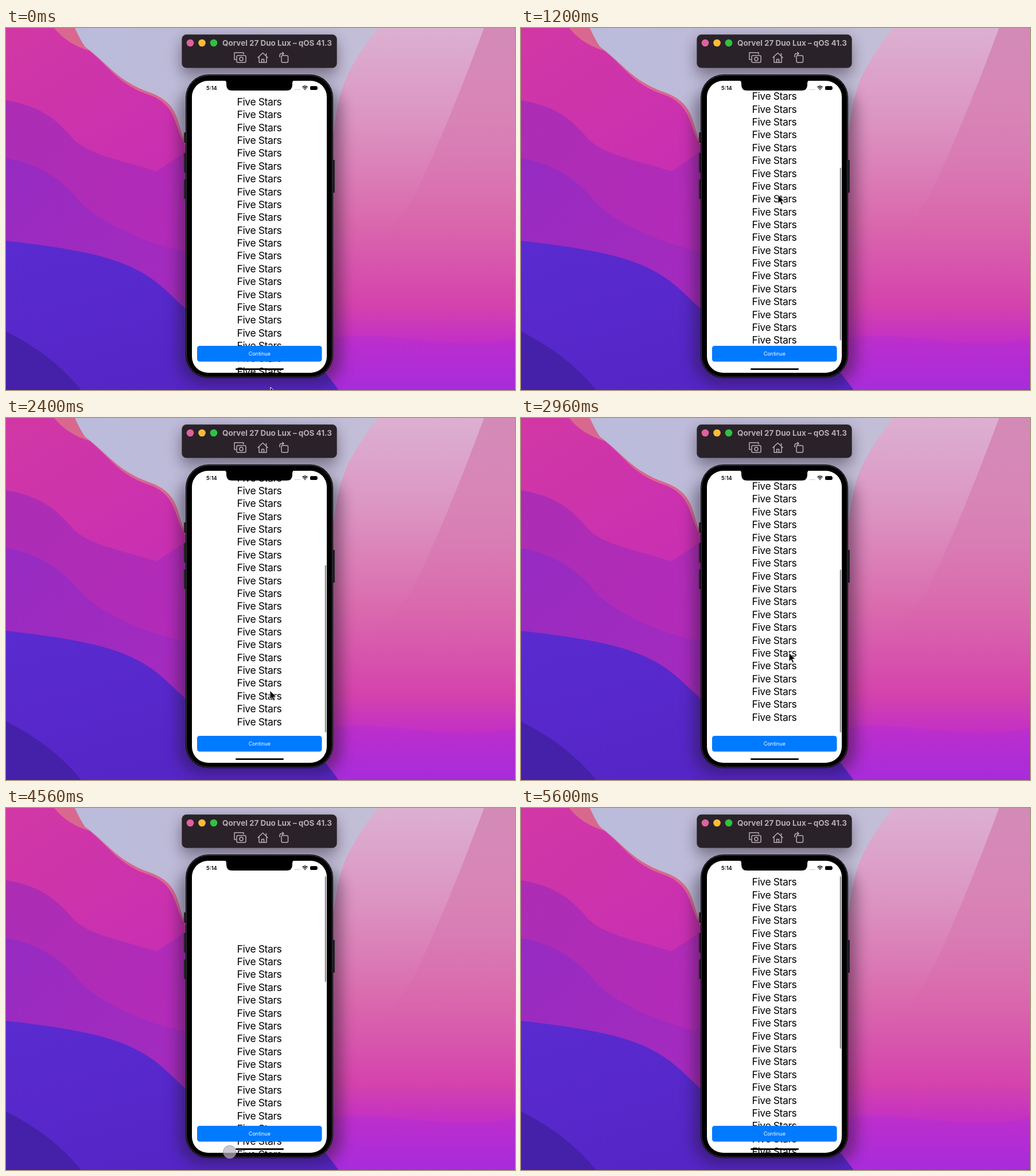
Recreate the animation shown at these times as an HTML page. Size 887x631 px, loop 5.68 s.

```html
<!DOCTYPE html>
<html lang="en">
<head>
<meta charset="utf-8">
<title>Scrolling list</title>
<style>
  html, body { margin: 0; width: 100%; height: 100%; overflow: hidden; }
  svg { display: block; width: 887px; height: 631px; font-family: Inter, "Liberation Sans", sans-serif; }
  #rows { font-size: 17.5px; letter-spacing: -.4px; text-anchor: middle; }
  .icon { fill: none; stroke: #b8afb6; stroke-width: 1.5; stroke-linejoin: round; }
  .shadow { fill: #1c1222; filter: blur(13px); opacity: .45; }
</style>
</head>
<body>
<svg viewBox="0 0 887 631">
  <defs>
    <linearGradient id="sky"><stop stop-color="#b9bce0"/><stop offset=".5" stop-color="#bfbad4"/><stop offset="1" stop-color="#c8c4dd"/></linearGradient>
    <linearGradient id="pink" x2=".3" y2="1"><stop stop-color="#d238a4"/><stop offset="1" stop-color="#c229bb"/></linearGradient>
    <linearGradient id="plum" x2=".8" y2="1"><stop stop-color="#ac2db4"/><stop offset="1" stop-color="#b42abb"/></linearGradient>
    <linearGradient id="violet" x2=".7" y2="1"><stop stop-color="#962bc2"/><stop offset="1" stop-color="#a82abd"/></linearGradient>
    <linearGradient id="blue" x2=".6" y2="1"><stop stop-color="#592bd0"/><stop offset="1" stop-color="#5525c5"/></linearGradient>
    <linearGradient id="rose" x2="0" y2="1">
      <stop stop-color="#dcb0d1"/><stop offset=".25" stop-color="#dc95c3"/><stop offset=".52" stop-color="#da6bae"/>
      <stop offset=".76" stop-color="#d543ac"/><stop offset=".87" stop-color="#c22fc6"/><stop offset="1" stop-color="#a52cda"/>
    </linearGradient>
    <linearGradient id="fold" x2="0" y2="1"><stop stop-color="#d07aaa" stop-opacity=".7"/><stop offset="1" stop-color="#d955a4" stop-opacity="0"/></linearGradient>
    <clipPath id="screen"><rect x="324" y="92" width="235" height="509" rx="28"/></clipPath>
  </defs>

  <!-- Wallpaper -->
  <rect width="887" height="631" fill="url(#sky)"/>
  <path fill="#d9688f" d="M80 0H120Q130 22 138 33C182 66 194 92 250 112S296 170 314 200V260H80Z"/>
  <path fill="url(#pink)" d="M0 0H84Q106 28 146 40C184 72 196 98 248 116S292 174 314 206V631H0Z"/>
  <path fill="url(#plum)" d="M0 126C55 134 88 158 114 190S210 232 262 250L314 215V631H0Z"/>
  <path fill="url(#violet)" d="M0 227C50 234 96 262 124 297S230 372 314 390V631H0Z"/>
  <path fill="url(#blue)" d="M0 371C70 379 150 389 205 411S280 460 314 490L560 600L580 631H0Z"/>
  <path fill="#4520a9" d="M0 529Q82 570 131 631H0Z"/>
  <path fill="url(#rose)" d="M648 0Q596 66 583 115T556 300V600L580 631H887V0Z"/>
  <path fill="url(#fold)" d="M833 0C800 90 750 215 710 295Q680 350 596 420H887V0Z"/>
  <path fill="#a82bdc" opacity=".3" d="M570 540C670 524 780 568 887 540V631H580Z"/>

  <!-- Window bar -->
  <rect class="shadow" x="306" y="22" width="270" height="60" rx="8"/>
  <rect class="shadow" x="302" y="102" width="282" height="518" rx="42"/>
  <rect x="306.5" y="11.5" width="270" height="58" rx="8" fill="#2a2229" stroke="#4c434b" stroke-opacity=".5"/>
  <circle cx="321" cy="26" r="6.3" fill="#de629f"/>
  <circle cx="341.5" cy="26" r="6.3" fill="#f9bc37"/>
  <circle cx="362" cy="26" r="6.3" fill="#30c144"/>
  <text x="377" y="30.5" font-size="13.45" font-weight="700" fill="#b6adb4">Qorvel 27 Duo Lux – qOS 41.3</text>
  <g class="icon">
    <path d="M401 55H398V43H414V46"/>
    <rect x="402" y="48" width="16" height="12" rx="2"/>
    <circle cx="410" cy="54" r="3"/>
    <path d="M438.5 52L447.5 43.5L456.5 52M441 50V60H454V50M445.5 60V54.5H449.5V60M453.5 48V44"/>
    <rect x="480" y="48" width="11.5" height="12" rx="2"/>
    <path d="M477 51V48Q477 44.500 481 44.500H484M481.500 42L484 44.500L481.500 47"/>
  </g>

  <!-- Phone -->
  <path fill="none" stroke="#26222a" stroke-width="4" d="M312 182v18M312 218v34M312 264v34M571 230v57"/>
  <rect x="313" y="81" width="257" height="529" rx="40"/>
  <rect x="314.5" y="82.5" width="254" height="526" rx="38.500" fill="none" stroke="#47424a"/>
  <g clip-path="url(#screen)">
    <rect x="324" y="92" width="235" height="509" fill="#fff"/>
    <g id="rows"></g>
    <rect id="bar" x="555.7" width="2.3" rx="1.1" fill="#8d8a91"/>
    <rect x="333" y="554" width="217.500" height="27.500" rx="4.500" fill="#007aff"/>
    <text x="441.8" y="571" font-size="9" fill="#fff" text-anchor="middle">Continue</text>
    <rect x="400" y="593.3" width="84" height="2.6" rx="1.3"/>
  </g>
  <path d="M380 91H503Q499 92 499 96V99Q499 109 489 109H394Q384 109 384 99V96Q384 92 380 91Z"/>
  <text x="349" y="108" font-size="9.3" font-weight="600">5:14</text>
  <path d="M503 107.300h10" stroke="#bbb" stroke-width="1.300" stroke-dasharray="1.600 1"/>
  <path fill="none" stroke="#000" stroke-width="1.5" d="M516.5 103.2q4.500-4 9 0M518.300 105.300q2.700-2.300 5.400 0M520 107.200h2"/>
  <rect x="530" y="101.300" width="12.500" height="6.700" rx="1.800"/>
  <path d="M543.300 103.500v2.400" stroke="#777"/>

  <circle id="touch" r="11.3" fill="#b9b2c0" fill-opacity=".72" stroke="#8f8996" stroke-opacity=".7"/>
  <path id="pointer" stroke="#fff" d="M0 0V15.500L3.600 12.200L6 17.800L8.600 16.700L6.200 11.200H11Z"/>
</svg>
<script>
const LOOP = 5680, STEP = 80;
const ROWS = 28, PITCH = 22.37, MAX_SCROLL = 194, VIEW_HEIGHT = 435;
const TRACK_TOP = 119, BAR_LENGTH = 301, BAR_TRAVEL = 128;
const SETTLE = 175, TOUCH_LAG = 120, POINTER_PAUSE = 120;

// Each drag moves the finger between two points; the list then settles at rest.
const drags = [
  { down: 400, up: 960, from: [449, 433], to: [448, 260], rest: MAX_SCROLL },
  { down: 1680, up: 2080, from: [447, 553], to: [456, 430], rest: MAX_SCROLL },
  { down: 2400, up: 2840, from: [460, 475], to: [467, 409], rest: MAX_SCROLL },
  { down: 3200, up: 3640, from: [458, 472], to: [450, 375], rest: MAX_SCROLL },
  { down: 3960, up: 4560, from: [440, 165], to: [384, 650], rest: 0 },
];

const byId = id => document.getElementById(id);
const rows = byId("rows"), bar = byId("bar"), touch = byId("touch"), pointer = byId("pointer");

for (let i = 0; i < ROWS; i++) {
  rows.innerHTML += `<text x="441.5" y="${135 + i * PITCH}">Five Stars</text>`;
}

const clamp = (v, min, max) => Math.min(Math.max(v, min), max);
const progress = (t, start, end) => {
  const u = clamp((t - start) / (end - start), 0, 1);
  return u * u * (3 - 2 * u);
};
const mix = (a, b, u) => a.map((v, i) => v + (b[i] - v) * u);

function pointerAt(t) {
  let point = [461, 626], free = 0;
  for (const d of drags) {
    if (t < d.down) return mix(point, d.from, progress(t, free, d.down));
    point = mix(d.from, d.to, progress(t, d.down, d.up));
    free = d.up + POINTER_PAUSE;
    if (t < free) return point;
  }
  return point;
}

// Pulling past an end meets growing resistance.
function rubberBand(y) {
  const inside = clamp(y, 0, MAX_SCROLL), over = y - inside;
  return inside + over / (1 + Math.abs(over) * .55 / VIEW_HEIGHT) * .55;
}

function scrollAt(t) {
  let scroll = 0, rest = 0;
  for (const d of drags) {
    if (t < d.down) break;
    const bounce = scroll - rest;
    const pull = (d.from[1] - d.to[1]) * progress(t, d.down, d.up);
    const decay = Math.exp(-Math.max(t - d.up, 0) / SETTLE);
    scroll = bounce + d.rest + (rubberBand(rest + pull) - d.rest) * decay;
    rest = d.rest;
  }
  return scroll;
}

const touchOpacity = t =>
  Math.max(...drags.map(d => clamp(Math.min((t - d.down) / 80, 1 - (t - d.up) / 130), 0, 1)));

function draw(t) {
  const y = scrollAt(t), inside = clamp(y, 0, MAX_SCROLL), over = y - inside;
  rows.setAttribute("transform", `translate(0 ${-y})`);
  bar.setAttribute("y", TRACK_TOP + inside / MAX_SCROLL * BAR_TRAVEL + Math.max(over, 0));
  bar.setAttribute("height", BAR_LENGTH - Math.abs(over));
  bar.setAttribute("opacity", t < drags[0].down ? 0 : 1);

  pointer.setAttribute("transform", `translate(${pointerAt(t)})`);
  touch.setAttribute("transform", `translate(${pointerAt(t - TOUCH_LAG)})`);
  touch.setAttribute("opacity", touchOpacity(t));
}

const start = performance.now();
function tick() {
  const t = (performance.now() - start) % LOOP;
  draw(Math.floor(t / STEP) * STEP);
  requestAnimationFrame(tick);
}
tick();
</script>
</body>
</html>
```
